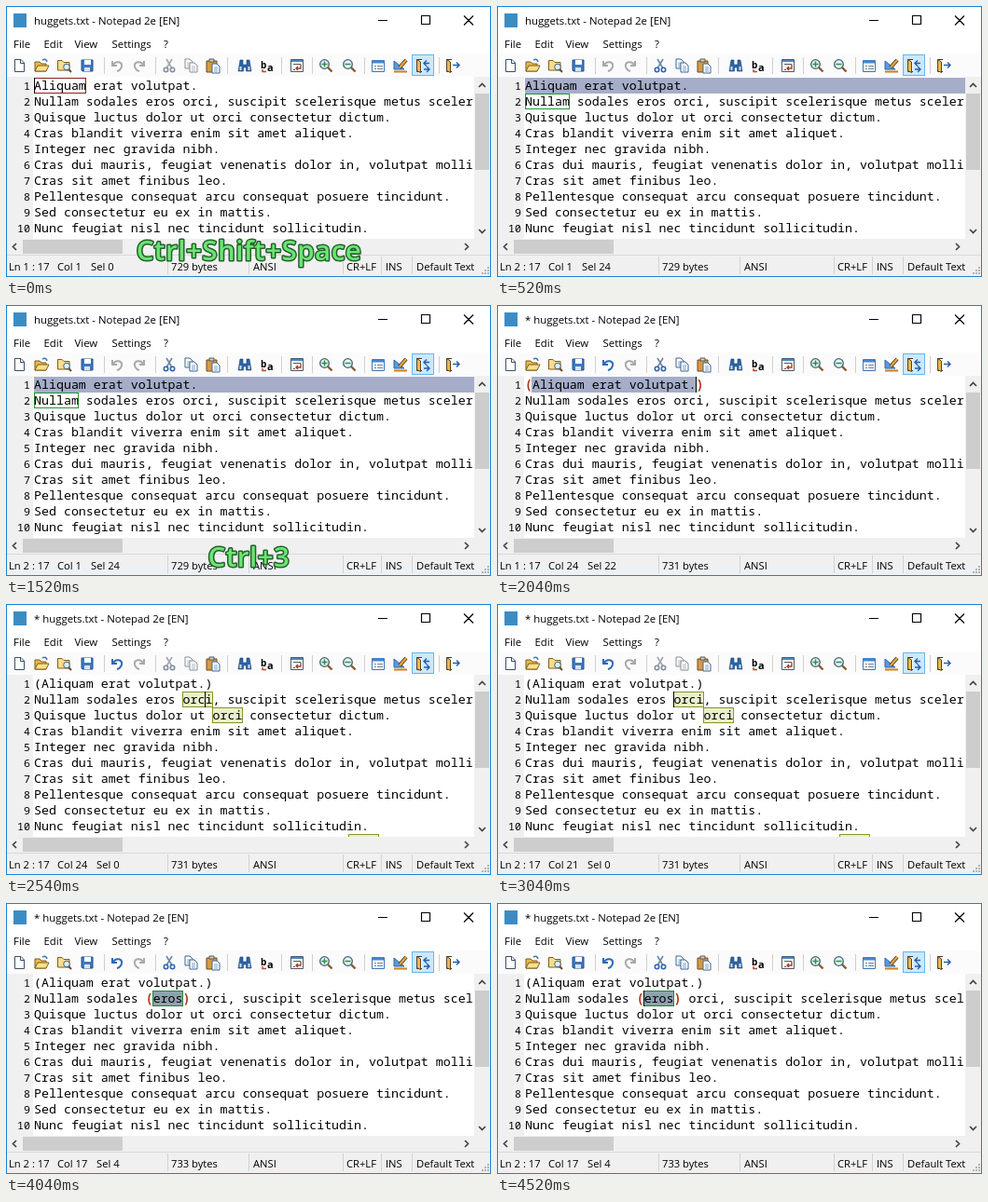
An HTML page that plays this animation: 520 px wide and 291 px high, repeating every 7520 ms.

```html
<!DOCTYPE html>
<html lang="en">
<head>
<meta charset="utf-8">
<title>Text editor</title>
<style>
html, body { margin: 0; width: 100%; height: 100%; overflow: hidden; background: #fff; }
svg { display: block; width: 100vw; height: 100vh; }
text { white-space: pre; fill: #000; }
.ui { font: 11.4px "Open Sans", "Noto Sans", sans-serif; }
.st { font: 11.2px "Open Sans", "Noto Sans", sans-serif; }
.code { font: 13.317px "Noto Sans Mono", "DejaVu Sans Mono", monospace; }
.num { font: 11.6px "Noto Sans Mono", "DejaVu Sans Mono", monospace; text-anchor: end; }
.brace { font-weight: 700; fill: #b0341a; }
.key { font: 600 29.5px "Open Sans", "Noto Sans", sans-serif; letter-spacing: .5px; text-anchor: middle;
  fill: #6be573; stroke: #24602c; stroke-width: 3px; stroke-linejoin: round; paint-order: stroke; }
.ln { fill: none; stroke-width: 1.4; }
.off { filter: grayscale(.7); opacity: .7; }
</style>
</head>
<body>
<svg viewBox="0 0 520 291">
  <defs>
    <clipPath id="view"><rect x="1" y="76" width="501" height="174"/></clipPath>
    <g id="page"><path d="M-4.500-6.500H2L5.500-3V6.500H-4.500Z" fill="#fff" stroke="#3c4f66"/><path d="M1.500-6.500V-2.500H5.500" fill="none" stroke="#3c4f66"/></g>
    <g id="lens"><path d="M2 2L6.500 6.500" stroke="#8a5a2c" stroke-width="2.400"/><circle cx="-1.500" cy="-1.500" r="4.800" fill="#e4f3fb" stroke="#44606f" stroke-width="1.300"/></g>
    <path id="turn" d="M-5-5V0H0M-4.500-.5C-1-6 6-4 5 1Q4 5 0 6" fill="none" stroke-width="2"/>
    <g id="door"><path d="M-1-6.500H-6.500V6.500H-1" fill="#fff" stroke="#2c3a4c"/><path d="M-6.500-6.500L-2.500-4V7.500L-6.500 5.500Z" fill="#eab84e" stroke="#5b4322"/></g>
    <g id="sheet"><path d="M-4-5H1L4-2V5H-4Z" fill="#fff" stroke="#3f648f"/><path d="M-2-1H2M-2 1H2M-2 3H2" stroke="#7ba2cf"/></g>
  </defs>

  <rect width="520" height="291" fill="#fff"/>
  <rect x="8" y="8" width="14" height="15" fill="#3c8cc4"/>
  <text id="title" class="ui" x="30" y="20"></text>
  <path d="M399 15.500H409M445.500 10.500H454.500V19.500H445.500ZM491 10.500L501 20.500M501 10.500L491 20.500" fill="none" stroke="#000" stroke-width="1.150"/>
  <g class="ui">
    <text x="8" y="45">File</text><text x="40.500" y="45">Edit</text><text x="73.500" y="45">View</text>
    <text x="113.500" y="45">Settings</text><text x="169" y="45">?</text>
  </g>

  <rect x="1" y="51" width="518" height="25" fill="#fbfbfb"/>
  <path d="M105.500 55V73M160.500 55V73M237.500 55V73M295.500 55V73M328.500 55V73M384.500 55V73M464.500 55V73" stroke="#cfcfcf"/>
  <g>
    <use href="#page" x="14" y="64"/>
    <g transform="translate(38 64)"><path d="M-7 6V-4H-2L0-2H5V6Z" fill="#e9b94c" stroke="#7d5c1c"/><path d="M-7 6L-4 0H8L5 6Z" fill="#ffe08a" stroke="#7d5c1c"/><path d="M1-6Q5-8 6-4" fill="none" stroke="#3f78b5" stroke-width="1.5"/></g>
    <g transform="translate(62 64)"><path d="M-6.500 5V-5.500H-2L0-3.500H6V5Z" fill="#f8dc8e" stroke="#7d5c1c"/><circle cx="3" cy="1.500" r="3.300" fill="#d8effa" stroke="#44606f"/><path d="M5 4L8 7" stroke="#6b4a2c" stroke-width="2"/></g>
    <g transform="translate(87 64)"><path d="M-6-6H6V6H-5L-6 5Z" fill="#3e78c0" stroke="#234f8c"/><path d="M-3-6H4V-1H-3Z" fill="#fff"/><path d="M-3 2H3V6H-3Z" fill="#d8e3ef"/></g>
    <use id="undo" href="#turn" x="119" y="64"/>
    <use href="#turn" transform="translate(143 64) scale(-1 1)" stroke="#a9a9a9"/>
    <g id="clip">
      <g transform="translate(175 64)" fill="none" stroke-width="1.600"><path d="M-3-7L3 3M3-7L-3 3" stroke="#6d87a5"/><circle cx="-3.500" cy="4.500" r="2.200" stroke="#2f65b0"/><circle cx="3.500" cy="4.500" r="2.200" stroke="#2f65b0"/></g>
      <use href="#sheet" x="196" y="62"/><use href="#sheet" x="201" y="66"/>
    </g>
    <g transform="translate(222 64)"><path d="M-7-5H4V7H-7Z" fill="#d79a45" stroke="#6f4818"/><path d="M-4-7H1V-4H-4Z" fill="#d5d5d5" stroke="#555"/><use href="#sheet" x="3" y="3"/></g>
    <g transform="translate(256 64)"><path d="M-5-6H-2V-1H2V-6H5L7 6H1.500V2H-1.500V6H-7Z" fill="#2c65a8" stroke="#1d3f70" stroke-width=".6"/><path d="M-4.500 1V5M4.500 1V5" stroke="#cfe2f6" stroke-width="2"/></g>
    <g transform="translate(280 64)"><text x="-7" y="3" style="font:700 10px 'Open Sans',sans-serif">b</text><text x="0" y="6" style="font:700 11px 'Open Sans',sans-serif">a</text><path d="M-5 4V6.500H-1" class="ln" stroke="#b5472c"/></g>
    <g transform="translate(312 64)"><path d="M-6.500-6.500H6.500V6.500H-6.500Z" fill="#fff" stroke="#4d5867"/><path d="M-6-5H6" stroke="#4e86c2" stroke-width="2"/><path d="M-4-1.500H4M-4 4.500H-2" stroke="#555"/><path d="M4-1V3H-1M1 1L-1 3L1 5" class="ln" stroke="#a24025"/></g>
    <g transform="translate(343 64)"><use href="#lens"/><path d="M-4.500-1.500H1.500M-1.500-4.500V1.500" stroke="#2f923e" stroke-width="1.500"/></g>
    <g transform="translate(368 64)"><use href="#lens"/><path d="M-4.500-1.500H1.500" stroke="#2f923e" stroke-width="1.500"/></g>
    <g transform="translate(399 64)"><path d="M-6.500-5.500H6.500V6.500H-6.500Z" fill="#fff" stroke="#3e76b8"/><path d="M-6-4H6" stroke="#4785cf" stroke-width="3"/><path d="M-4 .5H-2M-1 .5H5M-4 3.500H-2M-1 3.500H5" stroke="#6f8298"/></g>
    <g transform="translate(423 64)"><path d="M-7-5V4H4Z" fill="#5b9add" stroke="#2e67a5"/><path d="M-1 2L6-6" stroke="#3b3228" stroke-width="4"/><path d="M-1 2L6-6" stroke="#eba53a" stroke-width="2.400"/><path d="M-7 6.500H7" stroke="#cc7f22" stroke-width="2"/></g>
    <rect x="435.500" y="52.500" width="23" height="22" fill="#cce8ff" stroke="#69b5ed"/>
    <g transform="translate(447 64)"><use href="#door"/><path d="M1-2.500H7M4-5.500L1-2.500L4 .5M1 4H7M4 1L7 4L4 7" class="ln" stroke="#245fac"/></g>
    <g transform="translate(479 64)"><use href="#door"/><path d="M0-.5H7M4-3.500L7-.5L4 2.500" class="ln" stroke="#245fac"/></g>
  </g>

  <g clip-path="url(#view)">
    <rect x="1" y="76" width="28" height="174" fill="#f0f0f0"/>
    <g id="marks"></g>
    <g id="lines"></g>
    <rect id="caret" width="1" height="17"/>
  </g>

  <path d="M502 76H519V267H1V250H502Z" fill="#f0f0f0"/>
  <path d="M503 94H518V176H503ZM18 251H125V266H18Z" fill="#cdcdcd"/>
  <path d="M507 87L510.500 83.500L514 87M507 240L510.500 243.500L514 240M11 255L7.500 258.500L11 262M492 255L495.500 258.500L492 262" fill="none" stroke="#444" stroke-width="1.700"/>
  <rect x="1" y="267" width="518" height="23" fill="#f0f0f0"/>
  <path d="M1 267.500H519" stroke="#d9d9d9"/>
  <path d="M173.500 269V288M260.500 269V288M361.500 269V288M402.500 269V288M435.500 269V288" stroke="#d2d2d2"/>
  <path d="M516 281h2M513 284h2M516 284h2M510 287h2M513 287h2M516 287h2" stroke="#b4b4b4" stroke-width="2"/>
  <g class="st">
    <text id="row" x="3" y="284"></text><text id="col" x="55" y="284"></text><text id="sel" y="284"></text>
    <text id="size" x="177" y="284"></text><text x="265" y="284">ANSI</text><text x="365" y="284">CR+LF</text>
    <text x="407" y="284">INS</text><text x="440" y="284">Default Text</text>
  </g>
  <rect x=".5" y=".5" width="519" height="290" fill="none" stroke="#1883d7"/>
  <text id="key" class="key" x="260.500"></text>
</svg>
<script>
const LOOP = 7520, LEFT = 30, TOP = 77, CW = 7.99, LH = 17;
const $ = id => document.getElementById(id);
const colX = c => Math.floor(LEFT + c * CW);
const rowY = r => TOP + r * LH;

const text = [
  "Aliquam erat volutpat.",
  "Nullam sodales eros orci, suscipit scelerisque metus sceler",
  "Quisque luctus dolor ut orci consectetur dictum.",
  "Cras blandit viverra enim sit amet aliquet.",
  "Integer nec gravida nibh.",
  "Cras dui mauris, feugiat venenatis dolor in, volutpat molli",
  "Cras sit amet finibus leo.",
  "Pellentesque consequat arcu consequat posuere tincidunt.",
  "Sed consectetur eu ex in mattis.",
  "Nunc feugiat nisl nec tincidunt sollicitudin."
];

const fill = (r, a, b, end = colX(b)) =>
  `<rect x="${colX(a)}" y="${rowY(r)}" width="${end - colX(a)}" height="${LH}" fill="#a5adc9"/>`;
const box = (r, a, b, line, back = "none") =>
  `<rect x="${colX(a) + .5}" y="${rowY(r) + .5}" width="${colX(b) - colX(a)}" height="${LH - 1}" fill="${back}" stroke="${line}"/>`;
const found = (r, a) => box(r, a, a + 4, "#8d9126", "#e9f0cd");
const picked = a => box(1, a, a + 4, "#25803a", "rgba(40,120,60,.2)");

const first = fill(0, 0, 0, 502) + box(1, 0, 6, "#25932f");
const orci = found(1, 20) + found(2, 24) + found(10, 42.3);
const inner = fill(1, 16, 20) + picked(16);

// row, col: caret position; wrap: how many pairs of brackets have been added
const base = { row: 1, col: 0, sel: 0, wrap: 0, lit: -1, on: true, key: "", marks: "" };
const steps = [
  { at: 0, row: 0, key: "Ctrl+Shift+Space", marks: box(0, 0, 7, "#8c1f1f") },
  { at: 520, sel: 24, on: false, marks: first },
  { at: 1050, sel: 24, marks: first },
  { at: 1520, sel: 24, on: false, key: "Ctrl+3", marks: first },
  { at: 2040, row: 0, col: 23, sel: 22, wrap: 1, lit: 0, marks: fill(0, 1, 23) },
  { at: 2540, col: 23, wrap: 1, marks: orci },
  { at: 3040, col: 20, wrap: 1, marks: orci },
  { at: 3540, col: 15, sel: 5, wrap: 1, key: "Ctrl+3", marks: fill(1, 15, 20) + picked(15) },
  { at: 4040, col: 16, sel: 4, wrap: 2, lit: 1, on: false, marks: inner },
  { at: 4520, col: 16, sel: 4, wrap: 2, lit: 1, marks: inner }
].map(s => ({ ...base, ...s }));

function drawLine(s, line, i) {
  if (i === 0 && s.wrap > 0) line = `(${line})`;
  if (i === 1 && s.wrap > 1) line = line.replace("eros", "(eros)").slice(0, -2);
  if (i === s.lit) line = line.replace(/[()]/g, '<tspan class="brace">$&</tspan>');
  const y = rowY(i) + 13;
  return `<text class="num" x="26" y="${y}">${i + 1}</text><text class="code" x="${LEFT}" y="${y}">${line}</text>`;
}

function show(s) {
  $("title").textContent = (s.wrap ? "* " : "") + "huggets.txt - Notepad 2e [EN]";
  $("undo").setAttribute("stroke", s.wrap ? "#3169b5" : "#a9a9a9");
  $("clip").setAttribute("class", s.sel ? "" : "off");
  $("marks").innerHTML = s.marks;
  $("lines").innerHTML = text.map((line, i) => drawLine(s, line, i)).join("");
  $("caret").setAttribute("x", colX(s.col));
  $("caret").setAttribute("y", rowY(s.row));
  $("caret").setAttribute("opacity", s.on ? 1 : 0);
  $("row").textContent = `Ln ${s.row + 1} : 17`;
  $("col").textContent = `Col ${s.col + 1}`;
  $("sel").textContent = `Sel ${s.sel}`;
  $("sel").setAttribute("x", s.col > 8 ? 97 : 91);
  $("size").textContent = `${729 + 2 * s.wrap} bytes`;
  $("key").textContent = s.key;
  $("key").setAttribute("y", s.key.includes("p") ? 273 : 281);
}

let shown;
function tick(now) {
  const t = now % LOOP;
  const s = steps.findLast(step => step.at <= t) || steps[0];
  if (s !== shown) show(shown = s);
  requestAnimationFrame(tick);
}
tick(0);
</script>
</body>
</html>
```
